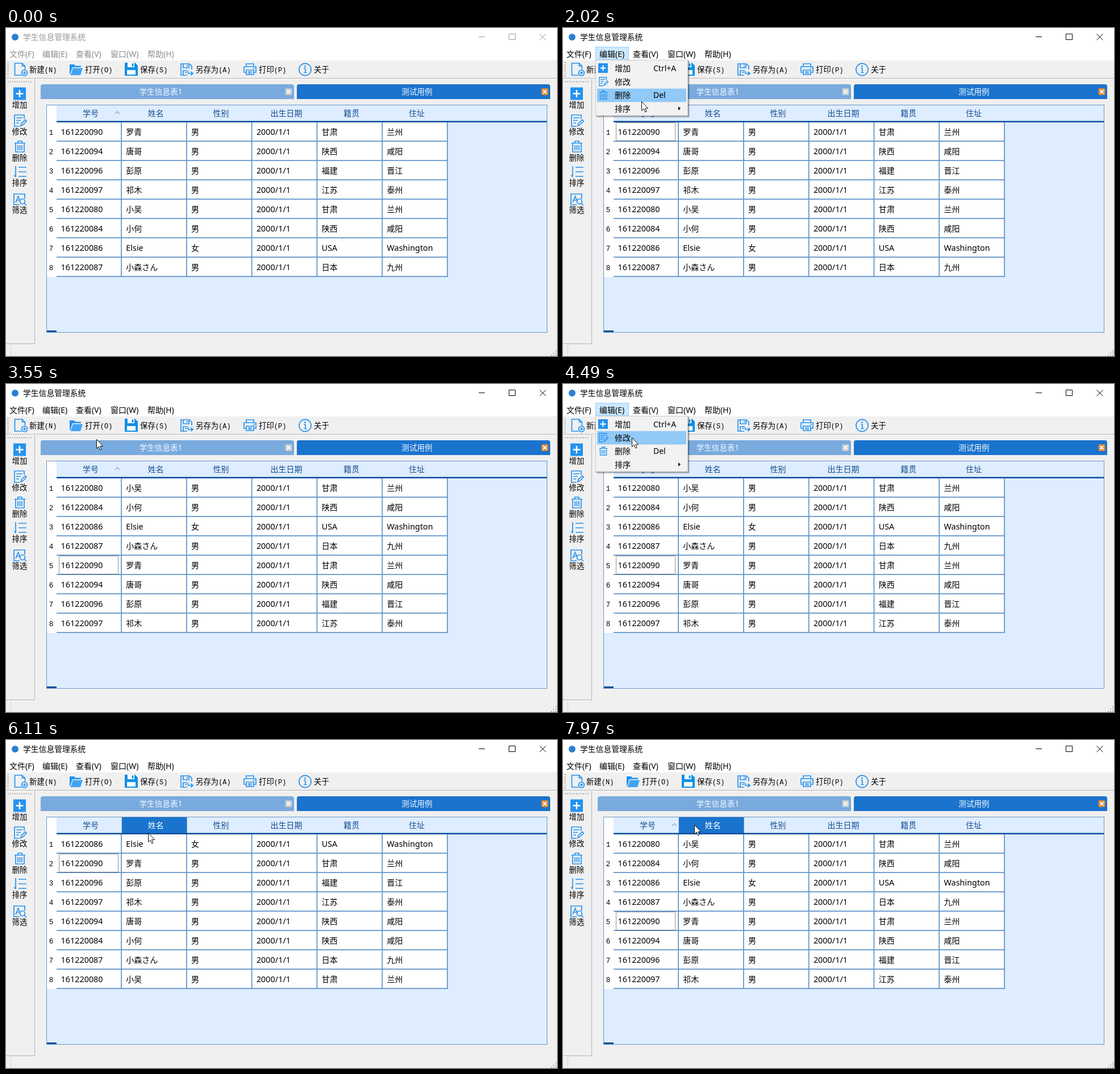
An HTML page that plays this animation: 970 by 577 pixels, repeating every 8 s.

```html
<!DOCTYPE html>
<html lang="zh-CN">
<head>
<meta charset="utf-8">
<title>学生信息管理系统</title>
<style>
html, body { margin: 0; width: 100%; height: 100%; overflow: hidden; background: #f0f0f0; }
svg { display: block; width: 100%; height: 100%; }
text { font: 14px "Noto Sans", "Noto Sans CJK SC", "Noto Sans CJK", sans-serif; white-space: pre; }
.latin { font-size: 14.4px; }
.tool { font-size: 13.4px; }
.mono { font: 12px "Liberation Mono", monospace; }
.mid { text-anchor: middle; }
.line { fill: none; stroke: #2492f0; stroke-width: 1.7; }
</style>
</head>
<body>
<svg id="stage" viewBox="0 0 970 577"></svg>
<script>
const LOOP = 8000, STEP = 77.5, START = 450;
const BLUE = '#2492f0', GRID = '#6497cb', DEEP = '#0b4f9e';
const ROW = 34, TOP = 166, COL = 114.8, LEFT = 89;

const rect = (x, y, w, h, fill, more = '') =>
  `<rect x="${x}" y="${y}" width="${w}" height="${h}" fill="${fill}" ${more}/>`;
const text = (x, y, s, cls = '', more = '') => `<text x="${x}" y="${y}" class="${cls}" ${more}>${s}</text>`;
const path = (d, more = 'class="line"') => `<path d="${d}" ${more}/>`;
const group = (x, y, s, body) => `<g transform="translate(${x} ${y}) scale(${s})">${body}</g>`;
const solid = (d, fill = BLUE) => path(d, `fill="${fill}"`);

// Icons are drawn in a box of about 22 x 22.
const icons = {
  create: path('M13 22H1V1H14L19 6V12M14 1V6H19') +
    '<circle cx="18" cy="18" r="5" class="line"/>' + path('M15 18H21M18 15V21'),
  open: solid('M0 2H8L10 4.5H20V7H5L1 19H0Z') + solid('M6 8.5H23L19 21H1.5Z', '#42a4f5'),
  save: solid('M0 0H18L23 5V23H0Z', '#1190e4') + rect(5, 0, 12, 8, '#fff') +
    rect(12.5, 1.5, 3, 5, '#1190e4') + rect(4, 13, 15, 8, '#fff'),
  saveAs: path('M12 21H1V1H16L20 5V11M5 1V8H15V1M12 3V6M5 21V13H13M8 16H12') +
    path('M14 14V18H21M18.5 15L22 18L18.5 21'),
  print: path('M5 6V1H18V6M5 16H1V6H22V16H18M5 12H18V20H5ZM8 15H15M8 17.5H15M17 9H20'),
  about: '<circle cx="11" cy="11" r="10.6" class="line"/>' + path('M9 9H11.5V16M9 16.5H14') +
    `<circle cx="11" cy="5.5" r="1.4" fill="${BLUE}"/>`,
  add: rect(0, 0, 22, 22, BLUE) + path('M11 4.5V17.5M4.5 11H17.5', 'stroke="#fff" stroke-width="2.6"'),
  edit: path('M10 21H1V1H18V8M4 6H15M4 10.5H12M4 15H9M12 20L13 16L20 9.5L22 12L15 19Z'),
  remove: path('M0 4.5H19M6 4V1H13V4M2 5V20H17V5M6 8V17M9.5 8V17M13 8V17'),
  sort: path('M8 2H22M8 10H22M8 18H22M3 0V19M0 16L3 19'),
  filter: path('M20 9V1H1V20H11M4 16L8.5 5L12 14M6 12H10') +
    '<circle cx="16" cy="14" r="4.5" class="line"/>' + path('M19 17L23 21')
};
const icon = (name, x, y, s = 1) => group(x, y, s, icons[name]);

const people = [
  ['161220090', '罗青', '男', '甘肃', '兰州'],
  ['161220094', '唐哥', '男', '陕西', '咸阳'],
  ['161220096', '彭原', '男', '福建', '晋江'],
  ['161220097', '祁木', '男', '江苏', '泰州'],
  ['161220080', '小吴', '男', '甘肃', '兰州'],
  ['161220084', '小何', '男', '陕西', '咸阳'],
  ['161220086', 'Elsie', '女', 'USA', 'Washington'],
  ['161220087', '小森さん', '男', '日本', '九州']
];
const orders = {
  entry: [0, 1, 2, 3, 4, 5, 6, 7],
  id: [4, 5, 6, 7, 0, 1, 2, 3],
  name: [6, 0, 2, 3, 1, 5, 7, 4]
};
const heads = ['学号', '姓名', '性别', '出生日期', '籍贯', '住址'];

function windowBars() {
  let s = rect(0, 0, 970, 57, '#fff') + rect(0, 57, 970, 520, '#f0f0f0');
  s += '<circle cx="16" cy="16" r="6" fill="#2b7fd4"/>';
  s += '<g id="caption">' + text(30, 21, '学生信息管理系统', '', 'style="font-size:13.8px"') +
    path('M832 15.5H843M885.5 10.5H896.5V20.5H885.5ZM939.5 10.5L950.5 21M950.5 10.5L939.5 21',
      'fill="none" stroke="currentColor"') + '</g>';
  s += rect(57.5, 33.5, 58, 22, '#cce8ff', 'id="barItem" stroke="#99d1ff"') + '<g id="menuBar">';
  ['文件(F)', '编辑(E)', '查看(V)', '窗口(W)', '帮助(H)'].forEach((m, i) => {
    s += text([6, 64, 123, 184, 249][i], 50.5, m);
  });
  s += '</g>' + rect(0, 88, 970, 1, '#b4b4b4') + rect(0, 89, 970, 1, '#fafafa');
  s += path('M3.5 60V87M3 94.5H47', 'stroke="#999" stroke-width="2" stroke-dasharray="1.5 2.5"');

  const tools = [
    ['create', 14.5, 61, 41, '新建', 'N'], ['open', 112, 62, 139, '打开', 'O'], ['save', 209, 61, 236, '保存', 'S'],
    ['saveAs', 307, 62, 334, '另存为', 'A'], ['print', 418, 62, 445, '打印', 'P'], ['about', 515.5, 62, 542, '关于', '']
  ];
  for (const [name, x, y, tx, label, key] of tools)
    s += icon(name, x, y) + text(tx, 77.5, label + (key && `<tspan class="mono">(${key})</tspan>`), 'tool');

  s += path('M50.5 90V555.5H0', 'fill="none" stroke="#b4b4b4"');
  [['add', 13, 104.5, '增加', 139.5], ['edit', 14, 152, '修改', 187], ['remove', 15, 198, '删除', 233],
    ['sort', 14, 243, '排序', 277], ['filter', 13, 291, '筛选', 325]].forEach(([name, x, y, label, ty]) => {
    s += icon(name, x, y) + text(24, ty, label, 'tool mid');
  });
  s += rect(8, 558, 1, 19, '#d5d5d5');
  for (let i = 0; i < 3; i++)
    for (let j = 0; j <= i; j++) s += rect(967 - 4 * j, 567 + 4 * i, 2, 2, '#b0b0b0');
  return s;
}

function tab(x, fill, label, closeFill) {
  return path(`M${x} 125V103Q${x} 99 ${x + 4} 99H${x + 442}Q${x + 446} 99 ${x + 446} 103V125Z`, `fill="${fill}"`) +
    text(x + 211.5, 117, label, 'mid', 'fill="#f4f9ff" style="font-size:13.6px"') +
    group(x + 430.5, 106, 1, rect(0, 0, 12, 12, closeFill, 'rx="2"') +
      path('M3 3L9 9M9 3L3 9', 'stroke="#fff" stroke-width="1.8"'));
}

function table() {
  let s = rect(71.5, 135.5, 881, 400, '#deedff', `stroke="${GRID}"`);
  s += rect(72, 136, 17, 302, '#fff') + rect(72, 532, 17, 3, DEEP);
  heads.forEach((h, i) => {
    s += rect(LEFT + COL * i, 136, COL, 28, '#1a73cd', `id="head${i}"`) +
      text(149 + COL * i, 155, h, 'mid', `id="label${i}"`);
  });
  s += path('M192 151L196 147L200 151', 'id="caret" fill="none" stroke="#476d9a"');
  s += rect(LEFT, 163.5, 863, 2.5, DEEP) + rect(LEFT, TOP, 689, 272, '#fff');
  for (let i = 0; i < 8; i++) {
    s += text(79.5, 188 + ROW * i, i + 1, 'mono mid', 'style="font-size:12.5px"') +
      rect(LEFT, TOP + 32.2 + ROW * i, 689, 1.8, GRID);
  }
  for (let i = 1; i < 7; i++) s += rect(LEFT - 1.6 + COL * i, TOP, 1.8, 272, GRID);
  people.forEach(([id, name, sex, home, city], i) => {
    s += `<g id="row${i}">`;
    [id, name, sex, '2000/1/1', home, city].forEach((v, c) => {
      s += text(96.5 + COL * c, 21.7, v, v.charCodeAt(0) < 128 ? 'latin' : '');
    });
    if (!i) s += rect(93.5, .5, 104, 32, 'none', 'id="focus" stroke="#222" stroke-dasharray="1" stroke-dashoffset=".5"');
    s += '</g>';
  });
  return s;
}

const panel = (x, y, w, h) =>
  rect(x + 3, y + 3, w, h, '#000', 'opacity=".12" rx="2"') + rect(x + 1, y + 1, w + 1, h + 1, '#000', 'opacity=".25" rx="1"') +
  rect(x + .5, y + .5, w - 1, h - 1, '#f2f2f2', 'stroke="#ccc"');

function menus() {
  let s = '<g id="menu">' + panel(57, 56, 163, 98.5) + rect(60, 0, 157, 23.6, '#91c9f7', 'id="pick"');
  s += icon('add', 62, 62, .77) + icon('edit', 63, 86, .75) + icon('remove', 64, 110, .75);
  ['增加', '修改', '删除', '排序'].forEach((m, i) => { s += text(91, 76 + 23.7 * i, m); });
  s += text(159, 76, 'Ctrl+A') + text(159, 123.4, 'Del') + solid('M203 138L207 141.5L203 145Z', '#111') + '</g>';
  s += '<g id="submenu">' + panel(216, 128, 140, 54) + rect(219, 0, 134, 23.6, '#91c9f7', 'id="subPick"') +
    text(250, 148, '按学号排序') + text(250, 172, '按姓名排序') + '</g>';
  return s;
}

const stage = document.getElementById('stage');
stage.innerHTML = windowBars() + tab(61, '#79aadd', '学生信息表1', '#c9cdd2') + tab(512, '#1a73cd', '测试用例', '#e08a35') +
  table() + menus() +
  path('M0 0V16L3.7 12.6L6.2 18.4L8.6 17.4L6.1 11.8H11.2Z',
    'id="cursor" fill="#fff" stroke="#111" stroke-linejoin="round"');

const $ = id => document.getElementById(id);
const show = (id, on) => $(id).setAttribute('display', on ? 'inline' : 'none');
const set = (id, key, v) => $(id).setAttribute(key, v);

// Pointer stops: time, x, y
const stops = [
  [450, 697, 552], [990, 92, 42], [1147, 90, 40], [1225, 89, 39], [1750, 89, 39], [2000, 138, 129],
  [2160, 147, 140], [2310, 170, 142], [2545, 231, 140], [2697, 226, 140], [3380, 226, 140], [3550, 159, 97],
  [3860, 92, 47], [4170, 87, 42], [4380, 87, 42], [4480, 121, 94], [4640, 140, 138], [4880, 180, 143],
  [5180, 244, 148], [5330, 250, 163], [6107, 250, 163], [6800, 163, 149], [7400, 163, 149], [7967, 231, 149]
];
function pointer(t) {
  const q = START + Math.floor((t - START + 12) / STEP) * STEP;
  let i = 0;
  while (i < stops.length - 2 && q > stops[i + 1][0]) i++;
  const [t0, x0, y0] = stops[i], [t1, x1, y1] = stops[i + 1];
  const u = Math.max(0, Math.min(1, (q - t0) / (t1 - t0))), k = u * u * (3 - 2 * u);
  return [Math.round(x0 + (x1 - x0) * k), Math.round(y0 + (y1 - y0) * k)];
}

function draw(t) {
  const within = (a, b) => t >= a && t < b;
  const active = t >= 1380;
  const pressed = within(1380, 2940) || within(4180, 5640);
  const menu = within(1460, 2940) || within(4260, 5640);
  const sub = within(2310, 2940) || within(4950, 5640);
  const byName = within(5720, 7020);
  const here = t >= START;
  const [x, y] = here ? pointer(t) : [-99, -99];

  set('caption', 'style', `fill:${active ? '#000' : '#999'};color:${active ? '#000' : '#999'}`);
  set('menuBar', 'fill', active ? '#000' : '#8c8c8c');
  show('barItem', pressed || (x >= 57 && x < 116 && y >= 33 && y < 56));
  set('barItem', 'fill', pressed ? '#cce8ff' : '#e5f3ff');
  set('barItem', 'stroke', pressed ? '#99d1ff' : '#cce8ff');

  show('menu', menu);
  show('submenu', sub);
  const inSub = sub && x >= 219 && y >= 131;
  const item = inSub ? 3 : Math.floor((y - 59) / 23.8);
  show('pick', item >= 0 && item < 4);
  set('pick', 'y', 59 + 23.8 * item);
  show('subPick', inSub);
  set('subPick', 'y', y < 155 ? 131 : 154.8);

  heads.forEach((_, i) => {
    const over = !menu && y >= 136 && y < 165 && Math.floor((x - LEFT) / COL) === i;
    show('head' + i, over);
    set('label' + i, 'fill', over ? '#fff' : '#174f91');
  });
  set('caret', 'transform', `translate(${byName ? COL : 0} 0)`);

  const order = byName ? orders.name : t >= 3010 ? orders.id : orders.entry;
  order.forEach((person, i) => set('row' + person, 'transform', `translate(0 ${TOP + ROW * i})`));
  show('focus', active);

  show('cursor', here);
  set('cursor', 'transform', `translate(${x + .5} ${y + .5})`);
}

const begin = performance.now();
function tick() {
  draw((performance.now() - begin) % LOOP);
  requestAnimationFrame(tick);
}
tick();
</script>
</body>
</html>
```
